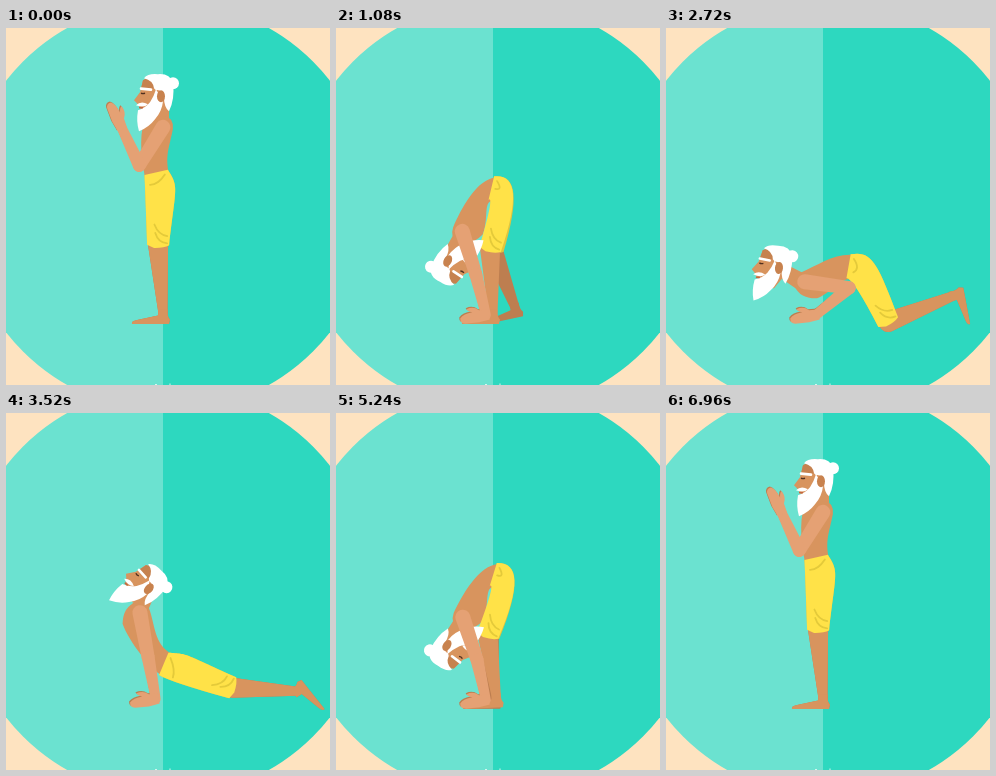
Animation, 324 px wide and 357 px high, one loop 7400 ms. Source, as an HTML page:

```html
<!DOCTYPE html>
<html lang="en">
<head>
<meta charset="utf-8">
<title>Sun salutation</title>
<style>
  html, body { margin: 0; width: 100%; height: 100%; overflow: hidden; background: #fee3c0; }
  svg { display: block; width: 324px; height: 357px; }
  .skin { fill: #d8945e; }
  .arm { fill: #e5a174; }
  .dark { fill: #bd7e50; }
  .cloth { fill: #ffe248; }
  .cloth-dark { fill: #dec53f; }
  .hair { fill: #fff; }
  .fold { fill: none; stroke: #e4ca3a; stroke-width: 1.8; stroke-linecap: round; }
</style>
</head>
<body>
<svg viewBox="0 0 324 357">
  <defs>
    <clipPath id="disc"><circle cx="162" cy="178.500" r="205"/></clipPath>
    <path id="foot" d="M-4.5-4L4.5-4Q4 3 7 6L6 10.5L-31 10.5Q-32 7.5-26 6.5L-5 2Z"/>
    <path id="hand" d="M3-5L-6-6Q-11-11-18-9Q-18-7-13-5Q-22-5-26-1Q-27 4-22 5L-8 6L3 5Z"/>
  </defs>
  <g clip-path="url(#disc)">
    <path fill="#6be2d0" d="M-50-30H157V390H-50Z"/>
    <path fill="#2dd8bf" d="M157-30H370V390H157Z"/>
  </g>
  <path fill="#d5f7f1" d="M149 356h2v1h-2zM163.500 355.500h1v1.500h-1z"/>

  <g id="figure">
    <path id="farArm" class="dark"/>
    <use id="farHand" href="#hand" class="dark"/>
    <path id="farShin" class="dark"/>
    <use id="farFoot" href="#foot" class="dark"/>
    <path id="farThigh" class="cloth-dark"/>
    <path id="neck" class="skin"/>
    <path id="torso" class="skin"/>
    <path id="shin" class="skin"/>
    <use id="nearFoot" href="#foot" class="skin"/>
    <path id="thigh" class="cloth"/>
    <path id="folds" class="fold"/>
    <g id="head">
      <path class="skin" d="M-19-17Q-8-24 2-12L4 8L-4 20L-22 11L-24 7L-28 3L-22-5Z"/>
      <path fill="#c6824f" d="M-19-17Q-13-20-9-16L-8-9L-21-8Z"/>
      <path class="hair" d="M-18-19Q-14-24-4-23Q8-24 11-14Q13 2 7 14Q2 10 2 0Q0-8-6-7L-8-9Q-9-17-18-19Z"/>
      <circle class="hair" cx="11" cy="-14" r="6"/>
      <path class="hair" d="M-6-8L1 4Q0 14-7 22Q-13 30-23 34Q-26 24-24 13Q-17 11-12 5Q-8-1-6-8Z"/>
      <path class="hair" d="M-26 8Q-21 3-14 7Q-18 11-26 8Z"/>
      <path d="M-21-8.500L-11-7.500" fill="none" stroke="#fff" stroke-width="2.600" stroke-linecap="round"/>
      <path d="M-21-4Q-19-3-17-4" fill="none" stroke="#4f3020" stroke-width="1.400"/>
      <path d="M-23 10.500L-19 10.500" fill="none" stroke="#c4673f" stroke-width="1.500"/>
      <ellipse cx="-1" cy="-1" rx="4" ry="6" fill="#c8824e"/>
    </g>
    <path id="upperArm" class="arm"/>
    <path id="foreArm" class="arm"/>
    <use id="nearHand" href="#hand" class="arm"/>
  </g>
</svg>
<script>
const LOOP = 7400, STEP = 40, FLOOR = 296;
const PALM = { x: 150, y: 287 };
const THIGH = 60, SHIN = 71, UPPER_ARM = 45, FOREARM = 43;

// lean: degrees from upright, negative towards the hands
// arm: direction and reach from the shoulder; grip: 1 with the palms on the floor
// head: neck length, neck lean, head tilt; near, far: ankle x and foot turn
const HOME = [157, 0], TUCKED = [276, -101];
const feet = (near, far = near) => ({ near, far });
const standing = { spine: 58, grip: 0, ...feet(HOME) };
const planted = { spine: 58, grip: 1, arm: [75, 88], ...feet(HOME) };

const prayer = { ...standing, hip: [153, 157], lean: 4, arm: [181, 42], head: [30, -2, 0] };
const arch = { ...standing, hip: [146, 157], lean: 16, arm: [317, 88], head: [32, 8, 23] };
const reachOut = { ...standing, hip: [152, 157], lean: -12, arm: [200, 88], head: [38, -23, -10] };
const fold = { ...planted, hip: [168, 163], lean: -134, head: [32, -152, -152] };
const step = { ...fold, far: [179, -12] };
const lunge = { ...planted, hip: [188, 218], lean: -72, head: [26, -42, -25] };
const lungeOut = { ...lunge, ...feet(HOME, TUCKED) };
const lungeIn = { ...lunge, ...feet(TUCKED, [203, -8]) };
const plank = { ...planted, hip: [210, 205], lean: -82, head: [33, -63, -41], ...feet([314, -76]) };
const low = { ...planted, hip: [196, 240], lean: -105, head: [28, -65, 5], ...feet([288, -100]) };
const cobra = { ...planted, hip: [169, 257], lean: -31, spine: 67, head: [24, 24, 44], ...feet([291, -130]) };
const dog = { ...planted, hip: [225, 172], lean: -142, spine: 50, head: [27, -143, -125], ...feet([291, -15]) };

// Arrival time, pose, time held
const flow = [
  [0, prayer], [360, arch], [600, reachOut], [920, fold], [1080, step], [1520, lungeOut],
  [1960, plank, 280], [2560, low, 120], [3120, cobra, 360], [4080, dog, 200],
  [4540, lungeIn, 340], [5280, fold], [5840, reachOut], [6160, arch], [6960, prayer, 440]
].flatMap(([t, pose, hold]) => hold ? [{ t, pose }, { t: t + hold, pose }] : [{ t, pose }]);

// Monotone cubic: smooth through the poses, never past them
function sample(name, t) {
  let i = 0;
  while (i < flow.length - 2 && t >= flow[i + 1].t) i++;
  const span = flow[i + 1].t - flow[i].t, s = (t - flow[i].t) / span;
  return [flow[i].pose[name]].flat().map((_, c) => {
    const at = k => [flow[k].pose[name]].flat()[c];
    const slope = k => flow[k] && flow[k + 1] ? (at(k + 1) - at(k)) / (flow[k + 1].t - flow[k].t) : 0;
    const tangent = k => {
      const p = slope(k - 1), q = slope(k);
      return p * q <= 0 ? 0 : 2 * p * q / (p + q) * span;
    };
    const d = at(i + 1) - at(i), m = tangent(i), n = tangent(i + 1);
    return at(i) + s * (m + s * (3 * d - 2 * m - n + s * (m + n - 2 * d)));
  });
}

const DEG = Math.PI / 180;
const $ = id => document.getElementById(id);
const draw = (id, d) => $(id).setAttribute('d', d);
const place = (id, p, turn) =>
  $(id).setAttribute('transform', `translate(${p.x} ${p.y}) rotate(${turn})`);
const add = (p, v, k) => ({ x: p.x + v.x * k, y: p.y + v.y * k });
const lerp = (a, b, k) => a + (b - a) * k;
const mix = (p, q, k) => ({ x: lerp(p.x, q.x, k), y: lerp(p.y, q.y, k) });
const polar = (p, angle, r) => add(p, { x: Math.cos(angle), y: Math.sin(angle) }, r);
const along = lean => ({ x: Math.sin(lean * DEG), y: -Math.cos(lean * DEG) });
const frontOf = up => ({ x: up.y, y: -up.x });
const leanOf = (from, to) => Math.atan2(to.x - from.x, from.y - to.y) / DEG;
const unit = (p, q) => along(leanOf(p, q));
const at = p => `${p.x.toFixed(2)} ${p.y.toFixed(2)} `;

// Two-bone reach; the bend softens as the limb gets straight
function reach(root, target, l1, l2, side) {
  const full = l1 + l2, dx = target.x - root.x, dy = target.y - root.y;
  const d = Math.min(full, Math.max(Math.abs(l1 - l2) + 1, Math.hypot(dx, dy)));
  const angle = Math.atan2(dy, dx);
  const cos = (d * d + l1 * l1 - l2 * l2) / (2 * d * l1);
  const soft = Math.min(1, Math.max(0, (d / full - 0.77) / 0.23));
  const bend = Math.acos(Math.min(1, Math.max(-1, cos))) * (1 - soft * 0.85);
  return { mid: polar(root, angle + side * bend, l1), end: polar(root, angle, d) };
}

// The lowest point of the sole always rests on the floor
function ankle([x, turn]) {
  const sole = px => px * Math.sin(turn * DEG) + 10.5 * Math.cos(turn * DEG);
  return { x, y: FLOOR - Math.max(sole(-31), sole(6)), turn };
}

function limb(a, b, ra, rb) {
  const u = unit(a, b), n = { x: -u.y, y: u.x };
  return `M${at(add(a, n, ra))}L${at(add(b, n, rb))}A${rb} ${rb} 0 0 0 ${at(add(b, n, -rb))}` +
    `L${at(add(a, n, -ra))}A${ra} ${ra} 0 0 0 ${at(add(a, n, ra))}Z`;
}

function torsoPath(hip, shoulder, pelvis, chest) {
  const pf = frontOf(pelvis), cf = frontOf(chest), waist = add(hip, pelvis, 6);
  const back = add(waist, pf, -12), belly = add(waist, pf, 12);
  const nape = add(shoulder, cf, -10), breast = add(add(shoulder, cf, 20), chest, -5);
  const top = add(shoulder, chest, 11);
  return `M${at(back)}C${at(add(back, pelvis, 22))}${at(add(nape, chest, -20))}${at(nape)}` +
    `Q${at(add(top, cf, -9))}${at(top)}Q${at(add(top, cf, 14))}${at(breast)}` +
    `C${at(add(breast, chest, -18))}${at(add(belly, pelvis, 14))}${at(belly)}Z`;
}

function shortsPath(hip, knee, pelvis) {
  const pf = frontOf(pelvis), v = unit(hip, knee), n = { x: -v.y, y: v.x };
  const waist = add(hip, pelvis, 13), hem = add(knee, v, 3);
  const back = add(waist, pf, -12), front = add(waist, pf, 12);
  return `M${at(front)}L${at(back)}` +
    `C${at(add(add(back, pelvis, -20), pf, -7))}${at(add(hip, n, -17))}${at(add(knee, n, -11))}` +
    `Q${at(add(hem, n, -6))}${at(add(hem, n, 4))}L${at(add(knee, n, 11))}` +
    `Q${at(add(add(hip, pf, 6), n, 8))}${at(front)}Z`;
}

function foldPath(hip, knee, pelvis) {
  const v = unit(hip, knee), n = { x: -v.y, y: v.x };
  const crease = (k, side) => add(mix(hip, knee, k), n, side);
  return `M${at(crease(0.66, 4))}Q${at(crease(0.83, 0))}${at(crease(0.85, -9))}` +
    `M${at(crease(0.8, 3))}Q${at(crease(0.96, 0))}${at(crease(0.97, -9))}` +
    `M${at(add(hip, n, 9))}Q${at(add(hip, n, 1))}${at(add(add(hip, pelvis, 9), frontOf(pelvis), -8))}`;
}

function render(t) {
  const [x, y] = sample('hip', t), hip = { x, y };
  const [lean] = sample('lean', t), [spine] = sample('spine', t);
  const [armAngle, armReach] = sample('arm', t), [neckLength, neckLean, tilt] = sample('head', t);
  const grip = sample('grip', t)[0] ** 2;
  const nearFoot = ankle(sample('near', t)), farFoot = ankle(sample('far', t));

  const shoulder = add(hip, along(lean), spine);
  const head = add(shoulder, along(neckLean), neckLength);
  const near = reach(hip, nearFoot, THIGH, SHIN, 1), far = reach(hip, farFoot, THIGH, SHIN, 1);
  const wrist = mix(polar(shoulder, armAngle * DEG, armReach), PALM, grip);
  const arm = reach(shoulder, wrist, UPPER_ARM, FOREARM, -1);
  const handTurn = lerp(leanOf(arm.mid, arm.end) + 90, -10, grip);

  // The pelvis sits between spine and rear thigh; the chest curls on past the spine
  const thighLean = Math.min(leanOf(near.mid, hip), leanOf(far.mid, hip));
  const pelvisLean = (lean + thighLean) / 2 - 15;
  const pelvis = along(pelvisLean), chest = along(lean + 0.4 * (lean - pelvisLean));
  const farWrist = add(arm.end, { x: -1, y: -1 }, 1);

  draw('farArm', limb(arm.mid, farWrist, 5, 4));
  place('farHand', farWrist, handTurn);
  draw('farShin', limb(far.mid, far.end, 10, 4.5));
  place('farFoot', far.end, farFoot.turn);
  draw('farThigh', shortsPath(hip, far.mid, pelvis));

  draw('neck', limb(add(shoulder, frontOf(chest), 3), head, 9, 7));
  draw('torso', torsoPath(hip, shoulder, pelvis, chest));
  draw('shin', limb(near.mid, near.end, 10, 4.5));
  place('nearFoot', near.end, nearFoot.turn);
  draw('thigh', shortsPath(hip, near.mid, pelvis));
  draw('folds', foldPath(hip, near.mid, pelvis));

  place('head', head, tilt);
  draw('upperArm', limb(shoulder, arm.mid, 7.5, 6.5));
  draw('foreArm', limb(arm.mid, arm.end, 6.5, 4.8));
  place('nearHand', arm.end, handTurn);
}

const start = performance.now();
function tick() {
  const t = (performance.now() - start) % LOOP;
  render(Math.floor(t / STEP) * STEP);
  requestAnimationFrame(tick);
}
tick();
</script>
</body>
</html>
```
